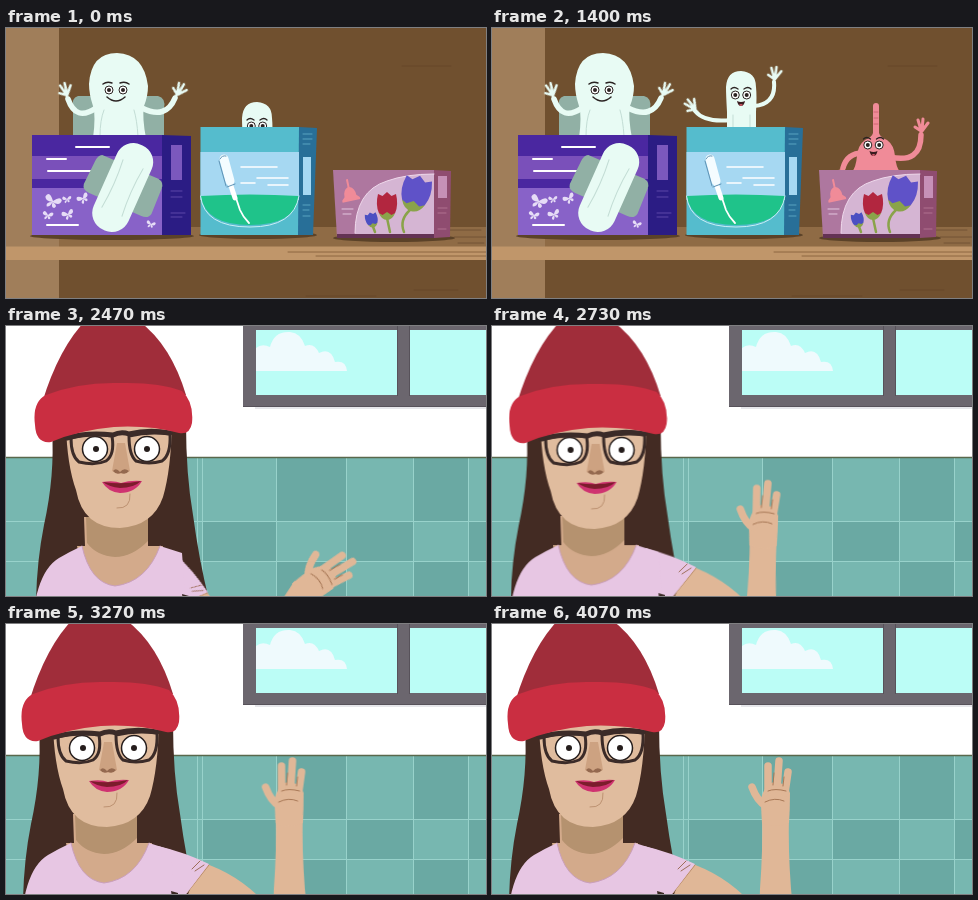
Write an HTML page that moves like this. It is 480 px wide and 270 px high and loops after 4140 ms.

```html
<!DOCTYPE html>
<html lang="en">
<head>
<meta charset="utf-8">
<title>Waving friends</title>
<style>
html, body { margin: 0; width: 100%; height: 100%; overflow: hidden; background: #fff; }
svg { display: block; width: 480px; height: 270px; }
.line { fill: none; stroke-linecap: round; stroke-linejoin: round; }
.move { animation: 4140ms ease-in-out infinite; }

#shelf { animation: shelf 4140ms step-end infinite; }
#bath { animation: bath 4140ms step-end infinite; }
@keyframes shelf { 0% { visibility: visible } 54.83%, 100% { visibility: hidden } }
@keyframes bath { 0% { visibility: hidden } 54.83%, 100% { visibility: visible } }

/* pad */
.pad-l { animation-name: pad-l; }
.pad-r { animation-name: pad-r; }
@keyframes pad-l {
  0%, 36%, 100% { transform: translate(61px, 69px) rotate(-18deg) }
  18%, 50% { transform: translate(61px, 69px) rotate(-22deg) }
}
@keyframes pad-r {
  0%, 36%, 100% { transform: translate(170px, 68px) rotate(26deg) }
  18%, 50% { transform: translate(170px, 68px) rotate(30deg) }
}

/* tampon */
.tam { animation-name: tam; }
.tam-la { animation-name: tam-la; }
.tam-lh { animation-name: tam-lh; }
.tam-ra { animation-name: tam-ra; }
.tam-rh { animation-name: tam-rh; }
@keyframes tam {
  0% { transform: translateY(30px) }
  8% { transform: translateY(-3px) }
  12%, 17.6%, 50%, 100% { transform: none }
  33.8% { transform: translate(-2px, -1px) }
}
@keyframes tam-la {
  0% { d: path("M242 110Q230 124 224 118") }
  12%, 17.6%, 50%, 100% { d: path("M241 85Q219 88 212 70") }
  33.8% { d: path("M239 92Q213 95 203 83") }
}
@keyframes tam-lh {
  0% { transform: translate(224px, 117px) rotate(-10deg) }
  12%, 17.6%, 50%, 100% { transform: translate(211px, 69px) rotate(-24deg) }
  33.8% { transform: translate(204px, 83px) rotate(-44deg) }
}
@keyframes tam-ra {
  0% { d: path("M262 110Q274 124 282 118") }
  12%, 17.6%, 50%, 100% { d: path("M263 85Q286 82 291 61") }
  33.8% { d: path("M262 78Q284 76 282 54") }
}
@keyframes tam-rh {
  0% { transform: translate(282px, 117px) rotate(10deg) }
  12%, 17.6%, 50%, 100% { transform: translate(291px, 60px) rotate(10deg) }
  33.8% { transform: translate(282px, 53px) rotate(2deg) }
}

/* cup */
.cup { animation-name: cup; }
.cup-la { animation-name: cup-la; }
.cup-lh { animation-name: cup-lh; }
.cup-ra { animation-name: cup-ra; }
.cup-rh { animation-name: cup-rh; }
@keyframes cup {
  0%, 6% { transform: translateY(90px) }
  14% { transform: translateY(-3px) }
  17.6% { transform: none }
  28%, 100% { transform: translateY(15px) }
}
@keyframes cup-la {
  0%, 6% { d: path("M368 200Q350 200 345 190") }
  14%, 17.6% { d: path("M370 107Q344 102 341 131") }
  28%, 100% { d: path("M371 125Q355 125 351 140") }
}
@keyframes cup-lh {
  0%, 6% { transform: translate(345px, 190px) rotate(180deg) }
  14%, 17.6% { transform: translate(341px, 130px) rotate(176deg) }
  28%, 100% { transform: translate(351px, 140px) rotate(190deg) }
}
@keyframes cup-ra {
  0%, 6% { d: path("M400 200Q420 200 425 190") }
  14%, 17.6% { d: path("M397 109Q430 101 438 125") }
  28%, 41%, 100% { d: path("M398 129Q429 136 429 107") }
  48% { d: path("M398 129Q433 134 436 108") }
}
@keyframes cup-rh {
  0%, 6% { transform: translate(425px, 190px) rotate(150deg) }
  14%, 17.6% { transform: translate(438px, 125px) rotate(126deg) }
  28%, 41%, 100% { transform: translate(429px, 105px) rotate(0deg) }
  48% { transform: translate(436px, 106px) rotate(14deg) }
}

/* woman */
.head { animation-name: head; }
.torso { animation-name: torso; }
.upper { animation-name: upper; }
.fore { animation-name: fore; }
.palm { animation-name: palm; }
@keyframes head {
  0%, 59.66% { transform: translate(13px, -1px) }
  68%, 100% { transform: none }
}
@keyframes torso {
  0%, 59.66% { transform: translate(11px, 1px) }
  68%, 100% { transform: none }
}
@keyframes upper {
  0%, 59.66% { transform: translate(150px, 230px) rotate(30deg) translate(-150px, -230px) }
  67%, 100% { transform: translate(150px, 230px) rotate(0deg) translate(-150px, -230px) }
}
@keyframes fore {
  0%, 54.9% { transform: translate(296px, 340px) rotate(38deg) }
  59.66% { transform: translate(297px, 266px) rotate(34deg); animation-timing-function: ease-out }
  70.8%, 88.65% { transform: translate(262px, 199px) rotate(-9deg) }
  79.7%, 98.3%, 100% { transform: translate(283px, 195px) rotate(0deg) }
}
@keyframes palm {
  0%, 59.66% { transform: rotate(21deg) }
  70.8% { transform: rotate(-14deg) }
  79.7%, 98.3%, 100% { transform: rotate(0deg) }
  88.65% { transform: rotate(-23deg) }
}
</style>
</head>
<body>
<svg viewBox="0 0 480 270">
<defs>
  <clipPath id="above"><rect width="480" height="200"/></clipPath>
  <path id="hand" class="line" d="M0 2L0-3M0-2L-6-6M0-3L-3-13M1-3L2-14M1-2L7-10"/>
  <g id="eye">
    <circle r="4" fill="#fff" stroke="#2b2322"/>
    <circle r="2" fill="#2b2322"/>
  </g>
  <g id="face">
    <use href="#eye" x="-5.700"/><use href="#eye" x="5.700"/>
    <path class="line" stroke="#2b2322" stroke-width="1.3" d="M-10-6Q-7-9-3-6M3-6Q7-9 10-6"/>
    <path d="M-4 6Q0 8 4 6Q3 11 0 11Q-3 11-4 6Z" fill="#3a1d20"/>
    <path d="M-2 10Q0 8 2 10L0 11Z" fill="#d8586a"/>
  </g>
  <path id="fly" d="M0 0Q-7-8-8-1Q-7 3 0 1Q-6 4-3 7Q0 6 0 1Q1 7 4 5Q6 2 0 1Q8 2 7-4Q4-7 0 0Z"/>
  <g id="bud">
    <path d="M0-16L5-12 10-14Q13-3 9 5Q5 10 0 10Q-5 10-9 5Q-13-3-10-14L-5-12Z"/>
    <path d="M-9 5L-5 7 0 4 5 7 9 5Q6 12 0 12Q-6 12-9 5Z" fill="#8aa34a"/>
  </g>
</defs>

<g id="shelf">
  <rect width="480" height="270" fill="#70502f"/>
  <rect width="53" height="270" fill="#a07e5a"/>
  <path d="M53 199H480V219H53Z" fill="#8f6b45"/>
  <rect y="218.500" width="480" height="13.500" fill="#c0966a"/>
  <path class="line" stroke="#664729" d="M396 38H445M408 262H452M300 268H370"/>
  <path class="line" stroke="#735334" d="M436 202H475M448 209H480M452 215H478"/>
  <path class="line" stroke="#8d6741" d="M282 224H480M310 228H480"/>
  <g fill="#5b4228">
    <ellipse cx="106" cy="208" rx="82" ry="4"/>
    <ellipse cx="252" cy="207" rx="59" ry="4"/>
    <ellipse cx="388" cy="210" rx="61" ry="4"/>
  </g>

  <!-- pad character -->
  <path d="M72 68H152Q160 70 158 80V110H67V80Q65 70 72 68Z" fill="#91b0a5"/>
  <g class="line" stroke="#e8fbf4" stroke-width="5.500">
    <path d="M90 80Q70 94 62 71M136 80Q160 92 169 70"/>
    <g stroke-width="2.600">
      <use href="#hand" class="move pad-l"/>
      <use href="#hand" class="move pad-r"/>
    </g>
  </g>
  <path d="M87 110Q90 88 87 78Q83 66 83 56Q85 25 111 25Q138 26 142 58Q142 68 138 78Q136 90 140 110Z" fill="#e8fbf4"/>
  <path class="line" stroke="#c3ddd5" d="M94 108Q94 92 98 82M132 108Q131 92 128 82"/>
  <g>
    <use href="#eye" x="103" y="62"/><use href="#eye" x="117" y="62"/>
    <path class="line" stroke="#2b2322" stroke-width="1.5" d="M97 56Q101 53 106 55M114 55Q119 53 123 56M101 69Q110 77 119 69"/>
  </g>

  <!-- purple box -->
  <path d="M26 107H158V207H26Z" fill="#4a27a0"/>
  <path d="M156 107L185 108V207H156Z" fill="#2b1c84"/>
  <path d="M26 128H156V151H26Z" fill="#7a50ba"/>
  <path d="M26 160H156V207H26Z" fill="#8862c8"/>
  <path class="line" stroke="#fff" stroke-width="2" d="M70 119H103M41 131H60M42 143H88M41 197H72"/>
  <g fill="#e6dcf6">
    <use href="#fly" transform="translate(47 173) rotate(25) scale(1.100)"/>
    <use href="#fly" transform="translate(62 186) rotate(-15) scale(.8)"/>
    <use href="#fly" transform="translate(77 170) rotate(-25) scale(.8)"/>
    <use href="#fly" transform="translate(61 171) scale(.6)"/>
    <use href="#fly" transform="translate(42 187) rotate(15) scale(.7)"/>
    <use href="#fly" transform="translate(145 196) rotate(20) scale(.6)"/>
  </g>
  <rect x="165" y="117" width="11" height="35" fill="#7b58bd"/>
  <path class="line" stroke="#5c46a8" d="M165 163H176M165 169H176M165 185H179M165 189H176"/>
  <g transform="translate(116.500 160) rotate(24)">
    <path d="M-32-22Q-36-20-36-13L-37 12Q-36 18-29 18H28Q36 18 37 12L36-15Q36-22 29-23Z" fill="#91b0a5"/>
    <rect x="-19" y="-47" width="38" height="93" rx="18" fill="#e8fbf4"/>
    <path class="line" stroke="#c3ddd5" d="M-11-26Q-8 0-11 26M11-26Q8 0 11 26"/>
  </g>

  <!-- tampon character -->
  <g class="line" stroke="#e8fbf4" stroke-width="4">
    <path class="move tam-la" d="M241 85Q219 88 212 70"/>
    <path class="move tam-ra" d="M263 85Q286 82 291 61"/>
    <g stroke-width="2.600">
      <use href="#hand" class="move tam-lh"/>
      <use href="#hand" class="move tam-rh"/>
    </g>
  </g>
  <g class="move tam">
    <path d="M237 150V85Q236 68 236 60Q237 44 251 44Q266 45 266 60Q267 70 266 85V150Z" fill="#e8fbf4"/>
    <path class="line" stroke="#c3ddd5" d="M243 100V88M260 100V88"/>
    <use href="#face" x="251" y="68"/>
  </g>

  <!-- teal box -->
  <path d="M194.500 99H294V207H194.500Z" fill="#55bccd"/>
  <path d="M293 99L311 100 307 207H292Z" fill="#286f98"/>
  <path d="M194.500 124H293V172H194.500Z" fill="#a6d8f2"/>
  <path d="M194.500 168Q244 165 293 168Q289 197 244 197Q200 197 194.500 168Z" fill="#1fc38a"/>
  <path class="line" stroke="#c9eef5" d="M194.500 168Q198 199 244 199Q288 199 293 168"/>
  <path class="line" stroke="#fff" stroke-width="1.5" d="M235 139H271M251 150H282M235 155H249M262 157H282"/>
  <path class="line" stroke="#fff" stroke-width="1.800" d="M230 170L234 182Q237 189 243 195"/>
  <path class="line" stroke="#fff" stroke-width="5" d="M224 155L229 170"/>
  <path class="line" stroke="#f4fcff" stroke-width="9" d="M218 131L224 153"/>
  <path class="line" stroke="#5f93b5" d="M214 131Q216 127 220 128M213 133L220 158M221 159L229 156"/>
  <rect x="297" y="129" width="8" height="38" fill="#a6d8f2"/>
  <path class="line" stroke="#58a3c0" d="M297 106H306M297 111H306M297 116H304M297 177H304M297 182H303M297 188H304"/>

  <!-- cup character -->
  <g clip-path="url(#above)">
    <g class="line" stroke="#f08b98" stroke-width="5.500">
      <path class="move cup-la" d="M370 107Q344 102 341 131"/>
      <path class="move cup-ra" d="M397 109Q430 101 438 125"/>
      <g stroke-width="3">
        <use href="#hand" class="move cup-lh"/>
        <use href="#hand" class="move cup-rh"/>
      </g>
    </g>
    <g class="move cup">
      <path d="M381 90V63Q381 60 384 60Q387 60 387 63V90Q388 94 395 97Q402 102 403 113Q404 124 408 129H411Q414 129 414 132V137Q414 140 411 140H357Q354 140 354 137V132Q354 129 357 129H360Q364 124 365 113Q366 102 373 97Q380 94 381 90Z" fill="#f08b98"/>
      <path class="line" stroke="#cf6673" d="M358 130Q384 127 410 130M382 69H386M382 75H386M382 81H386"/>
      <use href="#face" x="381.500" y="102"/>
    </g>
  </g>

  <!-- pink box -->
  <path d="M327 142H428V210H331Z" fill="#ae779f"/>
  <path d="M428 142L445 143 444 209 428 210Z" fill="#8f4c70"/>
  <path d="M349 206Q349 163 381 153Q400 146 428 146V206Z" fill="#d5b5d3"/>
  <path d="M331 206H428V210H331Z" fill="#643254"/>
  <path class="line" stroke="#efd9ec" d="M349 205Q349 163 381 153Q400 146 428 146"/>
  <path class="line" stroke="#8aa34a" stroke-width="2.500" d="M381 190L384 204M404 182Q393 192 398 204M366 196L369 204"/>
  <use href="#bud" fill="#b2263f" transform="translate(381 180) scale(.9 1)"/>
  <use href="#bud" fill="#5f52c8" transform="translate(409 168) rotate(14) scale(1.300)"/>
  <use href="#bud" fill="#4b4fc2" transform="translate(366 193) rotate(-14) scale(.55)"/>
  <g transform="translate(344 166) rotate(-12)">
    <path d="M-1-15H1V-7Q6-5 6 2L9 5V7H-9V5L-6 2Q-6-5-1-7Z" fill="#f08b98"/>
  </g>
  <path class="line" stroke="#e2c6de" d="M336 181H347M337 186H345"/>
  <rect x="432" y="148" width="9" height="22" fill="#c690b7"/>
  <path class="line" stroke="#b0708f" d="M432 180H441M432 185H440M432 201H440"/>
</g>

<g id="bath">
  <rect width="480" height="270" fill="#fff"/>
  <rect y="131" width="480" height="139" fill="#77b7b0"/>
  <path d="M270 132H340V195H270ZM407 132H462V195H407ZM196 195H270V235H196ZM340 195H407V235H340ZM462 195H480V235H462ZM270 235H340V270H270ZM407 235H462V270H407Z" fill="#6aa9a3"/>
  <path class="line" stroke="#98d2cb" d="M0 195.500H480M0 235.500H480M191.500 132V270M196.500 132V270M270.500 132V270M340.500 132V270M407.500 132V270M462.500 132V270"/>
  <path stroke="#59684c" stroke-width="1.500" d="M0 131.500H480"/>
  <rect x="249" y="81" width="231" height="2" fill="#e6e6ea"/>
  <rect x="237" width="243" height="81" fill="#6b666e"/>
  <path d="M250 4H391V69H250ZM403 4H480V69H403Z" fill="#bbfdf6"/>
  <path d="M250 22Q256 17 264 21Q268 5 284 6Q295 7 299 20Q308 16 313 27Q325 21 329 36Q340 34 341 45H250Z" fill="#effafd"/>
  <path stroke="#57525a" d="M237 80.500H480M391.500 0V70M403.500 0V70"/>

  <g class="move head">
    <path d="M33 105Q36 150 25 200Q18 235 17 275H190Q180 235 174 190Q167 150 167 98Z" fill="#432b23"/>
  </g>
  <g class="move torso">
    <path d="M67 190H131V219H146L130 275H72L60 219H68Z" fill="#d3aa8b"/>
    <path d="M69 190H131V214Q115 230 98 230Q80 229 70 216Z" fill="#b5926f"/>
    <g class="move upper">
      <path d="M195 238Q232 250 258 278L240 300H170Z" fill="#e0b797"/>
      <path class="line" stroke="#b88a66" d="M203 241L181 269"/>
      <path d="M152 222Q178 228 203 240L181 269L160 300H140Z" fill="#e7c6e3"/>
      <path class="line" stroke="#9d6d58" d="M186 245L194 237M189 247L198 241"/>
    </g>
    <path d="M14 320Q15 247 42 231Q52 225 65 219Q73 256 98 259Q130 255 143 219L165 226 172 320Z" fill="#e7c6e3"/>
    <path class="line" stroke="#c99fbb" d="M65 219Q73 256 98 259Q130 255 143 219"/>
    <path d="M165 267L172 269V273H166Z" fill="#3a2924"/>
  </g>

  <g class="move head">
    <path d="M47 100Q48 140 57 165Q64 203 101 203Q134 201 144 172Q152 145 153 98Z" fill="#e0bc9e"/>
    <path class="line" stroke="#bd9272" d="M98 183Q112 184 111 169"/>
    <path d="M98 118H106L111 146Q102 151 93 146Z" fill="#cda281"/>
    <path d="M94 146Q97 142 101 147Q105 142 110 146Q107 150 102 148Q97 150 94 146Z" fill="#94694f"/>
    <path d="M83 157Q95 155 102 158Q111 155 123 156Q116 168 101 168Q89 167 83 157Z" fill="#cf3370"/>
    <path d="M84 157Q103 160 122 156Q115 163 101 163Q90 162 84 157Z" fill="#7c1c2c"/>
    <g fill="#fff" stroke="#251d1c" stroke-width="1.500">
      <circle cx="76" cy="124" r="12.500"/><circle cx="128" cy="124" r="12.500"/>
    </g>
    <g fill="#251d1c"><circle cx="77" cy="124" r="3"/><circle cx="128" cy="124" r="3"/></g>
    <g class="line" stroke="#3b2b28" stroke-width="3">
      <path d="M52 113Q70 108 93 111Q96 130 87 136Q76 141 60 137Q52 131 52 113ZM110 111Q130 106 151 109Q152 130 143 136Q130 140 117 136Q110 130 110 111Z"/>
      <path stroke-width="5" d="M48 113Q68 107 94 110Q102 106 110 109Q130 104 151 108"/>
    </g>
    <path d="M23 78Q40 22 68-6Q95-18 120-4Q152 20 167 70Z" fill="#a02d3a"/>
    <path d="M16 100Q13 77 27 70Q60 57 100 58Q140 57 163 66Q175 77 173 98Q171 110 160 108Q130 100 95 102Q60 105 32 117Q17 119 16 100Z" fill="#ca2e41"/>
  </g>

  <g class="move fore">
    <path d="M-13-4Q-12 30-15 70L-17 130H22L16 70Q13 30 14-4Z" fill="#e0b797"/>
    <g class="move palm">
      <path d="M-13 4Q-14-10-14-20Q-10-36 0-37Q12-36 15-26Q15-10 14 4Q0 10-13 4Z" fill="#e0b797"/>
      <g class="line" stroke="#e0b797" stroke-width="7.500">
        <path d="M-9-13Q-18-18-23-32M-7-28L-7-53M2-30L4-58M10-26L13-47"/>
      </g>
      <path class="line" stroke="#a87856" d="M-7-28Q0-31 11-28M-10-17Q0-22 9-18M-2-34L-1-46M8-33L9-42"/>
    </g>
  </g>
</g>
</svg>
</body>
</html>
```
